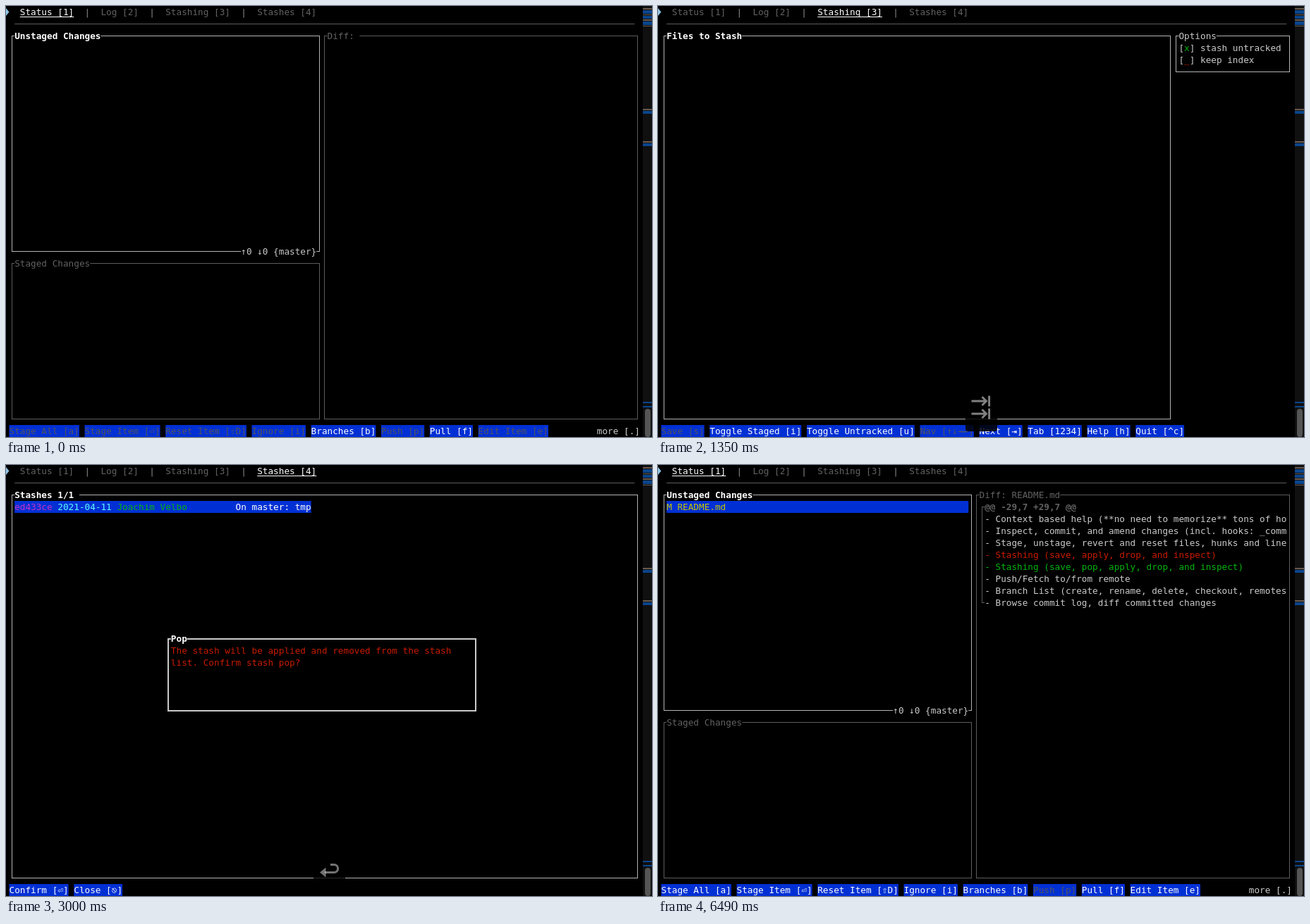
Recreate the animation shown at these times as an HTML page with a canvas. Size 916 px wide and 612 px high, loop 6590 ms.

```html
<!DOCTYPE html>
<html lang="en">
<head>
<meta charset="utf-8">
<title>Terminal git client</title>
<style>
html, body { margin: 0; width: 100%; height: 100%; overflow: hidden; background: #000; }
canvas { display: block; }
</style>
</head>
<body>
<canvas id="stage" width="916" height="612"></canvas>
<script>
const ctx = document.getElementById('stage').getContext('2d');
const W = 916, H = 612, LOOP = 6590;
const CELL = 7.645, ROW = 17, LEFT = 4.5;
const FONT = '12.7px "DejaVu Sans Mono", "Noto Sans Mono", monospace';
const C = {
  white: '#ffffff', text: '#cacaca', dim: '#626262', dimLine: '#5c5c5c', line: '#b4b4b4',
  blue: '#0030d4', off: '#53535c', magenta: '#c930c7', cyan: '#60fdff',
  green: '#00b40c', red: '#c91b00', yellow: '#c7c400'
};

const colX = col => LEFT + col * CELL;
const lineX = (col, weight = 1) => Math.round(colX(col + 0.5) - weight / 2);
const lineY = row => row * ROW + 8;

function rect(x, y, w, h, color) {
  ctx.fillStyle = color;
  ctx.fillRect(x, y, w, h);
}

// Text sits on the terminal grid, one character per cell.
function put(col, row, str, color = C.text, bold = false) {
  ctx.font = (bold ? 'bold ' : '') + FONT;
  ctx.fillStyle = color;
  [...str].forEach((ch, i) => {
    if (ch !== ' ') ctx.fillText(ch, colX(col + i), row * ROW + 13);
  });
}

function fillCells(col, row, count, color) {
  rect(colX(col), row * ROW, count * CELL, ROW, color);
}

function label(col, row, str, color, bold) {
  fillCells(col, row, str.length, '#000');
  put(col, row, str, color, bold);
}

function box(c0, r0, c1, r1, color = C.line, weight = 1) {
  const x = lineX(c0, weight), y = lineY(r0), x1 = lineX(c1, weight), y1 = lineY(r1);
  rect(x, y, x1 - x + weight, weight, color);
  rect(x, y1, x1 - x + weight, weight, color);
  rect(x, y, weight, y1 - y, color);
  rect(x1, y, weight, y1 - y, color);
}

function panel(c0, r0, c1, r1, title, bright = true) {
  box(c0, r0, c1, r1, bright ? C.line : C.dimLine);
  label(c0 + 1, r0, title, bright ? C.white : C.dim, bright);
}

const TABS = ['Status [1]', 'Log [2]', 'Stashing [3]', 'Stashes [4]'];

function tabs(active) {
  let col = 2;
  TABS.forEach((name, i) => {
    put(col, 0, name, i === active ? C.white : C.dim);
    if (i === active) rect(colX(col), 15, name.length * CELL, 1, C.white);
    col += name.length;
    if (i < 3) put(col + 2, 0, '|', '#8a8a8a');
    col += 5;
  });
  rect(colX(1), lineY(1), 115 * CELL, 1, C.dimLine);
}

// A leading "~" marks a disabled command.
function commands(list) {
  let col = 0;
  for (const item of list.split(';')) {
    const off = item[0] === '~', name = off ? item.slice(1) : item;
    fillCells(col, 35, name.length, C.blue);
    put(col, 35, name, off ? C.off : C.white);
    col += name.length + 1;
  }
}

function commit(row, hash, date, author, msg, selected) {
  if (selected) fillCells(1, row, 41 + msg.length, C.blue);
  put(1, row, hash, C.magenta);
  put(9, row, date, C.cyan);
  put(20, row, author, C.green);
  put(42, row, msg, selected ? C.white : C.text);
}

const AUTHORS = {
  J: 'Joachim Velbo', t: 'tiagolmarenda', T: 'Tiago Marenda', A: 'TrimyoApp',
  Z: 'Zbigniew Kormacki', d: 'libwatcher-preview..', W: 'Wolfgang Osterlahn', H: 'Zoltán Hegybő'
};
const LOG = `50d863a 04-11 J update changelog
79a38a7 04-11 t Add pop stash command on Staches tab
1d90219 04-08 T Fix CommitMessage combine wrongly concatenating subject to body
0a608ae 04-07 J Fix 624 pull offline (#625)* fix pull being blocked if it fails* update ch
e65218d 04-06 A [Trimyo] Optimize images/assets/checkout-remote.gif -- 809.70kb ─→ 166.21k
f390fe8 04-06 J readme/changelog
6f722b4 04-06 J fix branchname width misalignment
b5f1e76 04-06 J Remote branches (#618)* allow checking out remote branch* set tracking bra
6e231ad 04-03 J update changelog
2596c8b 04-03 J fix panic on staging lines involving missing newline eof
eae99ea 03-30 J Ci for older rust (#610)* add ci for older rust version
9b531d3 03-29 Z Fix commit_amend in vim style key config
2ded43d 03-29 d Bump simplelog from 0.9.0 to 0.10.0Bumps [simplelog](https://github.com/ko
f6ab69e 03-29 d Bump which from 4.0.2 to 4.1.0Bumps [which](https://github.com/mikkoren/wh
0e85896 03-29 J fix nightly
a434bfb 03-29 J use new debug symbol splitting
4841951 03-29 d Bump anyhow from 1.0.39 to 1.0.40Bumps [anyhow](https://github.com/pvarsen
dcc01fb 03-25 J migrate some more to unicode-truncate crate
36b8ca6 03-24 d Bump anyhow from 1.0.38 to 1.0.39Bumps [anyhow](https://github.com/pvarsen
2e5b344 03-24 J branchlist was ignoring unicode boundaries on truncating strings (#603)* b
0a3c3c8 03-23 d Bump serde from 1.0.124 to 1.0.125Bumps [serde](https://github.com/serde-r
a2661a1 03-21 J update changelog
656561e 03-21 W Add \`g\` to toggle between staging and workdir (\`workarea\`) (#595)closes #5
63e5b29 03-21 J enforce line endings
a2ca58a 03-20 J use branches upstream remote if it is already tracked (#598)closes #597
e9b296a 03-20 J add remote name per branch
ae57cf3 03-20 J add unittest for inconclusive default remote (#492)
2989df0 03-20 d Bump pprof from 0.4.2 to 0.4.3Bumps [pprof](https://github.com/tikv/pprof-
f31bdc9 03-16 H Update Arch Linux install section of READMEgitui is now part of the Arch L
38f9ab4 03-15 J link blog post
f69ab5e 03-15 J fix nightly clippy`.split('\n');

const DIFF = [
  '- Context based help (**no need to memorize** tons of ho',
  '- Inspect, commit, and amend changes (incl. hooks: _comm',
  '- Stage, unstage, revert and reset files, hunks and line',
  '- Stashing (save, apply, drop, and inspect)',
  '- Stashing (save, pop, apply, drop, and inspect)',
  '- Push/Fetch to/from remote',
  '- Branch List (create, rename, delete, checkout, remotes',
  '- Browse commit log, diff committed changes'
];

function statusFrame(diffTitle) {
  tabs(0);
  panel(0, 2, 57, 20, 'Unstaged Changes');
  label(43, 20, '↑0 ↓0 {master}', C.text);
  panel(0, 21, 57, 34, 'Staged Changes', false);
  panel(58, 2, 116, 34, diffTitle, false);
  put(109, 35, 'more [.]');
}

function stashList() {
  tabs(3);
  panel(0, 2, 116, 34, 'Stashes 1/1 ');
  commit(3, 'ed433ce', '2021-04-11', AUTHORS.J, 'On master: tmp', true);
}

const scenes = {
  clean() {
    statusFrame('Diff: ');
    commands('~Stage All [a];~Stage Item [⏎];~Reset Item [⇧D];~Ignore [i];Branches [b];~Push [p];Pull [f];~Edit Item [e]');
  },
  log() {
    tabs(1);
    panel(0, 2, 116, 34, 'Commit 1138/1138 - {master}');
    LOG.forEach((entry, i) => {
      const [hash, day, who, ...words] = entry.split(' ');
      commit(3 + i, hash, '2021-' + day, AUTHORS[who], words.join(' '), i === 0);
    });
    commands('Scroll [↑↓];Details [⏎];Tag [t];Branches [b];Copy Hash [y];Push Tags [p];Next [⇥];Tab [1234];Help [h];Quit [^c]');
  },
  stashing() {
    tabs(2);
    panel(0, 2, 94, 34, 'Files to Stash');
    box(95, 2, 116, 5);
    label(96, 2, 'Options', C.text);
    put(96, 3, '[ ] stash untracked');
    put(97, 3, 'x', C.green);
    put(96, 4, '[ ] keep index');
    put(97, 4, '_', C.red);
    commands('~Save [s];Toggle Staged [i];Toggle Untracked [u];~Nav [↑↓→←];Next [⇥];Tab [1234];Help [h];Quit [^c]');
  },
  stashes() {
    stashList();
    commands('Scroll [↑↓];Pop [⏎];Apply [a];Drop [⇧D];Inspect [→];Next [⇥];Tab [1234];Help [h];Quit [^c]');
  },
  popup() {
    stashList();
    box(29, 14, 86, 20, C.text, 2);
    label(30, 14, 'Pop', C.white, true);
    put(30, 15, 'The stash will be applied and removed from the stash', C.red);
    put(30, 16, 'list. Confirm stash pop?', C.red);
    commands('Confirm [⏎];Close [⎋]');
  },
  changed() {
    statusFrame('Diff: README.md');
    fillCells(1, 3, 56, C.blue);
    put(1, 3, 'M README.md', C.yellow);
    const x = lineX(59), y = lineY(3), y1 = lineY(11);
    rect(x, y, 1, y1 - y, C.dimLine);
    rect(x, y, 4, 1, C.dimLine);
    rect(x, y1, 4, 1, C.dimLine);
    put(60, 3, '@@ -29,7 +29,7 @@', C.dim, true);
    DIFF.forEach((str, i) => put(60, 4 + i, str, i === 3 ? C.red : i === 4 ? C.green : C.text));
    commands('Stage All [a];Stage Item [⏎];Reset Item [⇧D];Ignore [i];Branches [b];~Push [p];Pull [f];Edit Item [e]');
  }
};

const keys = {
  tab(y) {
    ctx.lineWidth = 2.9;
    ctx.beginPath();
    ctx.moveTo(444.5, y); ctx.lineTo(465.5, y);
    ctx.moveTo(459.5, y - 6); ctx.lineTo(465.5, y); ctx.lineTo(459.5, y + 6);
    ctx.moveTo(469.6, y - 7.5); ctx.lineTo(469.6, y + 7.5);
    ctx.stroke();
  },
  enter(y) {
    ctx.lineWidth = 3;
    ctx.beginPath();
    ctx.moveTo(460, y - 11.5);
    ctx.lineTo(465, y - 11.5);
    ctx.bezierCurveTo(472.5, y - 11.5, 472.5, y - 0.5, 465, y - 0.5);
    ctx.lineTo(452, y - 0.5);
    ctx.stroke();
    ctx.beginPath();
    ctx.moveTo(445, y - 0.5); ctx.lineTo(453.5, y - 7.5); ctx.lineTo(453.5, y + 6.5);
    ctx.fill();
  }
};

// The key cap shown over the terminal, optionally with the previous press above it.
function keyCap(name, alpha, twice) {
  ctx.fillStyle = `rgba(0,0,0,${0.85 * Math.min(1, 2 * alpha)})`;
  ctx.beginPath();
  ctx.roundRect(436, 552, 45, 52, 4);
  ctx.fill();
  ctx.globalAlpha = alpha;
  ctx.strokeStyle = ctx.fillStyle = '#fff';
  keys[name](579);
  if (twice) keys[name](561);
  ctx.globalAlpha = 1;
}

const BLUE = [[6, 5], [14, 4], [22, 5], [149, 4], [195, 4], [562, 2], [568, 2]];
const BROWN = [[3, 2], [12, 1], [19, 2], [28, 1], [146, 2], [192, 2]];

function editorEdge() {
  rect(903, 0, 13, H, '#101010');
  for (const [y, h] of BROWN) rect(903, y, 13, h, '#68594f');
  for (const [y, h] of BLUE) rect(903, y, 13, h, '#0a458c');
  ctx.fillStyle = '#555';
  ctx.beginPath();
  ctx.roundRect(906, 572, 8, 40, 4);
  ctx.fill();
  ctx.fillStyle = '#8fc3e6';
  ctx.beginPath();
  ctx.moveTo(0, 3); ctx.lineTo(4.5, 8.5); ctx.lineTo(0, 14);
  ctx.fill();
}

// start ms, scene, key, opacity, previous press still visible
const STEPS = [
  [0, 'clean'],
  [1070, 'clean', 'tab', 0.5],
  [1140, 'log', 'tab', 0.9],
  [1210, 'log', 'tab', 1],
  [1350, 'stashing', 'tab', 0.5, true],
  [1420, 'stashing', 'tab', 1],
  [1570, 'stashing', 'tab', 0.5, true],
  [1640, 'stashes', 'tab', 0.9],
  [1710, 'stashes', 'tab', 1],
  [2070, 'stashes', 'tab', 0.75],
  [2140, 'stashes', 'tab', 0.3],
  [2210, 'stashes'],
  [3000, 'popup', 'enter', 0.45],
  [3070, 'popup', 'enter', 1],
  [3500, 'popup', 'enter', 0.45],
  [3570, 'popup'],
  [5920, 'popup', 'enter', 0.45],
  [5990, 'changed', 'enter', 0.9],
  [6070, 'changed', 'enter', 1],
  [6420, 'changed', 'enter', 0.45],
  [6490, 'changed']
];

let shown = null, start = null;

function draw([, scene, key, alpha, twice]) {
  rect(0, 0, W, H, '#000');
  scenes[scene]();
  editorEdge();
  if (key) keyCap(key, alpha, twice);
}

function tick(now) {
  start ??= now;
  const t = (now - start) % LOOP;
  const step = STEPS.findLast(s => s[0] <= t);
  if (step !== shown) draw(shown = step);
  requestAnimationFrame(tick);
}
requestAnimationFrame(tick);
</script>
</body>
</html>
```
